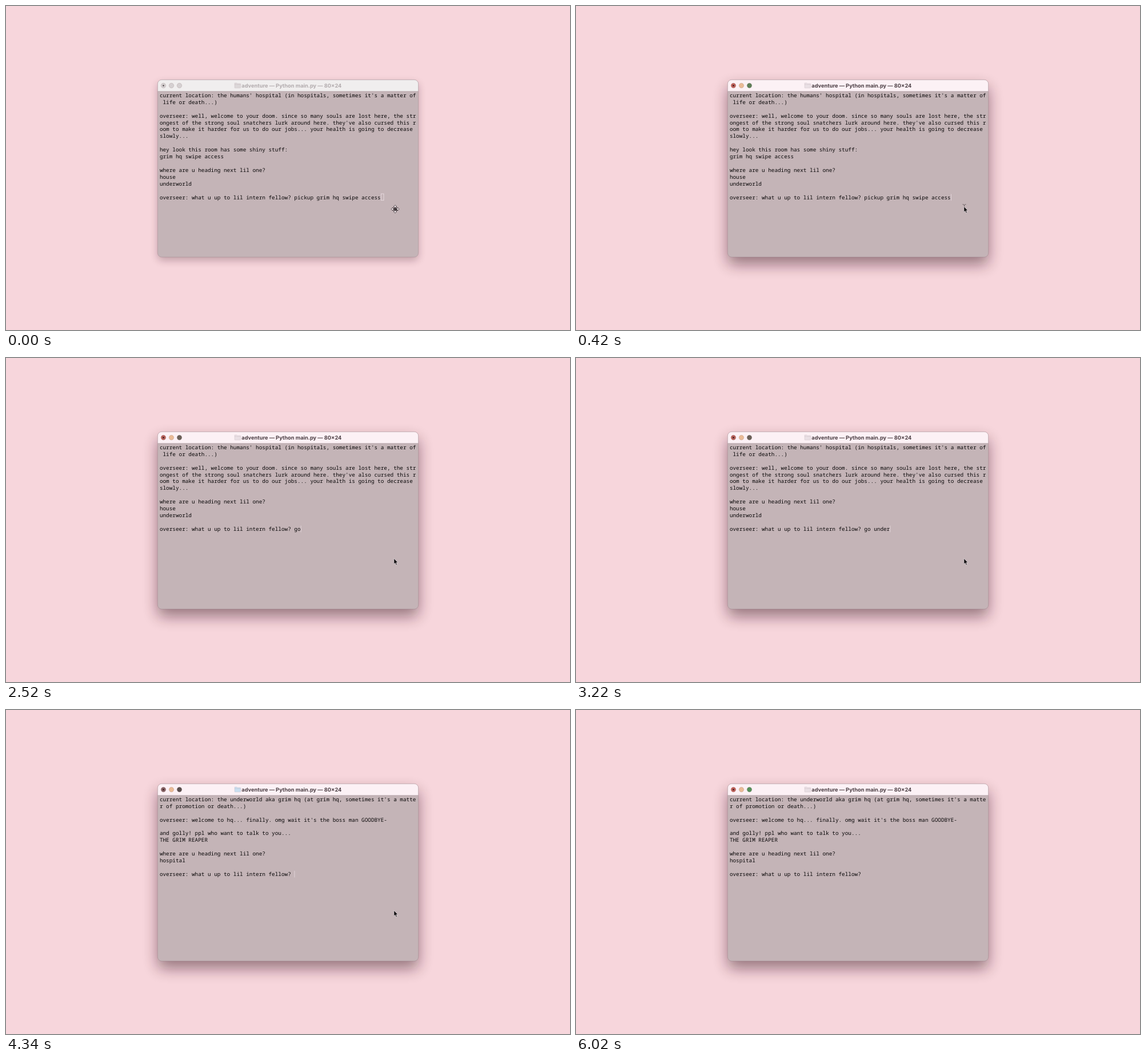
Write an HTML page that moves like this. It is 987 by 568 pixels and loops after 6190 ms.

```html
<!DOCTYPE html>
<html lang="en">
<head>
<meta charset="utf-8">
<title>Text adventure</title>
<style>
  html, body { margin: 0; width: 100%; height: 100%; overflow: hidden; background: #f7d6dc; }
  svg { display: block; width: 100%; height: 100%; }
  text { white-space: pre; text-rendering: geometricPrecision; }
  #lines text { font: 500 9.36px "Noto Sans Mono", "DejaVu Sans Mono", monospace; fill: #0a0809; }
  #title { font: 700 9.28px Inter, "Open Sans", sans-serif; text-anchor: middle; }
</style>
</head>
<body>
<svg viewBox="0 0 987 568">
  <defs>
    <filter id="wide" x="-20%" y="-20%" width="140%" height="150%"><feGaussianBlur stdDeviation="13"/></filter>
    <filter id="near" x="-20%" y="-20%" width="140%" height="150%"><feGaussianBlur stdDeviation="7"/></filter>
  </defs>
  <rect width="987" height="568" fill="#f7d6dc"/>
  <rect id="shadowOn" x="265.5" y="142" width="456" height="311" rx="8" fill="#30101a" opacity=".48" filter="url(#wide)"/>
  <rect id="shadowOff" x="265.5" y="135" width="456" height="311" rx="8" fill="#30101a" opacity=".27" filter="url(#near)"/>

  <rect x="265.5" y="129.5" width="456" height="310.5" rx="7" fill="#c4b4b7"/>
  <path id="bar" d="M265.5 149.5V136.5a7 7 0 0 1 7-7H714.5a7 7 0 0 1 7 7V149.5Z"/>
  <path d="M265.5 149.7H721.5" stroke="#b3a3a8" stroke-width=".6"/>
  <rect x="265.3" y="129.3" width="456.4" height="310.9" rx="7.2" fill="none" stroke="#967f87" stroke-opacity=".6" stroke-width=".7"/>

  <g id="lights" stroke="#6b4a4a" stroke-opacity=".3" stroke-width=".6">
    <circle cx="275.5" cy="139.5" r="4.2"/>
    <circle cx="289.5" cy="139.5" r="4.2"/>
    <circle cx="303.5" cy="139.5" r="4.2"/>
  </g>
  <circle id="dot" cx="275.5" cy="139.6" r="1.4"/>
  <g id="folder" stroke="#b9a9b0" stroke-opacity=".55" stroke-width=".5">
    <path d="M400 143V135.8q0-.9.9-.9h2.7l1.2 1.1h5q.9 0 .9.9V143q0 .8-.9.8h-8.9q-.9 0-.9-.8Z"/>
    <path d="M400 137.6H410.7" fill="none"/>
  </g>
  <text id="title" x="499.8" y="142.7">adventure — Python main.py — 80×24</text>

  <g id="lines"></g>
  <rect id="box" width="4.6" height="11.4" fill="none" stroke="#e9dce1" stroke-width=".9"/>
  <rect id="caret" width="1" height="11.6" fill="#e0d3d8"/>

  <g id="move" transform="translate(681 356)" fill="#f6eef0" stroke="#3c3236" stroke-width=".8" stroke-linejoin="round"></g>
  <path id="beam" d="M676.6 347.8q2.2 0 2.9 1.3q.7-1.3 2.9-1.3M679.5 349V354" fill="none" stroke="#4b4044" stroke-width=".8"/>
  <path id="arrow" d="M0 0V10L2.2 7.9L3.8 11.7L5.5 11L3.9 7.3H7Z" fill="#080607" stroke="#f3e8ec" stroke-width=".7" stroke-linejoin="round"/>
</svg>
<script>
const LOOP = 6190, LEFT = 268.9, TOP = 159.8, LEADING = 11.935, ADVANCE = 5.616;
const $ = id => document.getElementById(id);
const NS = "http://www.w3.org/2000/svg";
const add = (parent, tag, attrs = {}) => {
  const el = document.createElementNS(NS, tag);
  set(el, attrs);
  return parent.appendChild(el);
};
const set = (el, attrs) => { for (const k in attrs) el.setAttribute(k, attrs[k]); };
const show = (id, on) => $(id).setAttribute("visibility", on ? "visible" : "hidden");
// Last row whose start time has passed
const at = (rows, t) => rows.findLast(row => row[0] <= t);

const ask = "overseer: what u up to lil intern fellow? ";
const intro = [
  "current location: the humans' hospital (in hospitals, sometimes it's a matter of",
  " life or death...)",
  "",
  "overseer: well, welcome to your doom. since so many souls are lost here, the str",
  "ongest of the strong soul snatchers lurk around here. they've also cursed this r",
  "oom to make it harder for us to do our jobs... your health is going to decrease ",
  "slowly...",
  ""
];
const exits = ["where are u heading next lil one?", "house", "underworld", ""];
const screens = [
  [0, [...intro, "hey look this room has some shiny stuff:", "grim hq swipe access", "", ...exits, ask]],
  [1540, [...intro, ...exits, ask]],
  [4340, [
    "current location: the underworld aka grim hq (at grim hq, sometimes it's a matte",
    "r of promotion or death...)",
    "",
    "overseer: welcome to hq... finally. omg wait it's the boss man GOODBYE-",
    "",
    "and golly! ppl who want to talk to you...",
    "THE GRIM REAPER",
    "",
    "where are u heading next lil one?",
    "hospital",
    "",
    ask
  ]]
];

// Start time and number of letters typed
const command = "go underworld";
const keys = [[1540, 0], [2380, 1], [2520, 2], [2660, 3], [2940, 4], [3080, 6], [3220, 8],
  [3360, 9], [3500, 10], [3640, 11], [3780, 12], [3920, 13]];
const blink = [[0, 1], [840, 0], [1260, 1], [5320, 0], [5740, 1], [6020, 0]];
const pointer = [[280, 678.9, 351.4], [4760, 480, 366], [4900, 259.6, 388],
  [5040, 142, 452], [5180, 76.5, 513], [5320, -40, 600]];
// Start time, close, zoom and folder colours
const tints = [
  [0, "#d5d0d1", "#d5d0d1", "#dcd7d8"],
  [280, "#c0625b", "#5e7f58", "#e9dfe4"],
  [1540, "#a06560", "#6a5c58", "#c9def0"],
  [2380, "#b9635c", "#6a6058", "#e9dfe4"],
  [4060, "#be625b", "#5d7456", "#e9dfe4"],
  [4340, "#876365", "#5a4f4d", "#c9def0"],
  [5460, "#c1615a", "#56905a", "#e9dfe4"]
];

for (let a = 0; a < 360; a += 90)
  add($("move"), "path", { d: "M-1.3-2V-4.1H-3L0-7.1L3-4.1H1.3V-2Z", transform: `rotate(${a})` });
add($("move"), "path", { d: "M-3.2-2.4H3.2V2.8H-3.2Z", fill: "#6d6165", stroke: "none" });
add($("move"), "path", { d: "M-3 0H3M0-3V3M1 1.2H3.4V3", fill: "none", stroke: "#181315" });

const rows = Array.from({ length: 16 }, (_, i) =>
  add($("lines"), "text", { x: LEFT, y: TOP + i * LEADING }));
const [close, shrink, zoom] = $("lights").children;

function typed(t) {
  if (t < 1540) return "pickup grim hq swipe access";
  return t < 4340 ? command.slice(0, at(keys, t)[1]) : "";
}

function draw(t) {
  const active = t >= 280;
  const lines = at(screens, t)[1];
  const last = lines.length - 1;
  const input = typed(t);
  rows.forEach((row, i) => {
    const s = (lines[i] || "") + (i === last ? input : "");
    if (row.textContent !== s) row.textContent = s;
  });

  const x = LEFT + (ask.length + input.length) * ADVANCE;
  const y = TOP + last * LEADING;
  set($("caret"), { x: x - .4, y: y - 9.2 });
  set($("box"), { x, y: y - 9.6 });
  show("caret", active && at(blink, t)[1]);
  show("box", !active);

  const [, red, green, paper] = at(tints, t);
  set(close, { fill: red });
  set(shrink, { fill: active ? "#eabb96" : "#d5d0d1" });
  set(zoom, { fill: green });
  set($("dot"), { fill: active ? "#3d1c1e" : "#5d5557" });
  set($("folder"), { fill: paper });
  set($("bar"), { fill: active ? "#fcf1f5" : "#f0eeee" });
  set($("title"), { fill: active ? "#4c3f45" : "#b2abad" });
  show("shadowOn", active);
  show("shadowOff", !active);

  show("move", !active);
  show("beam", active && t < 560);
  show("arrow", active);
  if (active) {
    const [, px, py] = at(pointer, t);
    set($("arrow"), { transform: `translate(${px} ${py})` });
  }
}

const start = performance.now();
function tick() {
  draw((performance.now() - start) % LOOP);
  requestAnimationFrame(tick);
}
tick();
</script>
</body>
</html>
```
